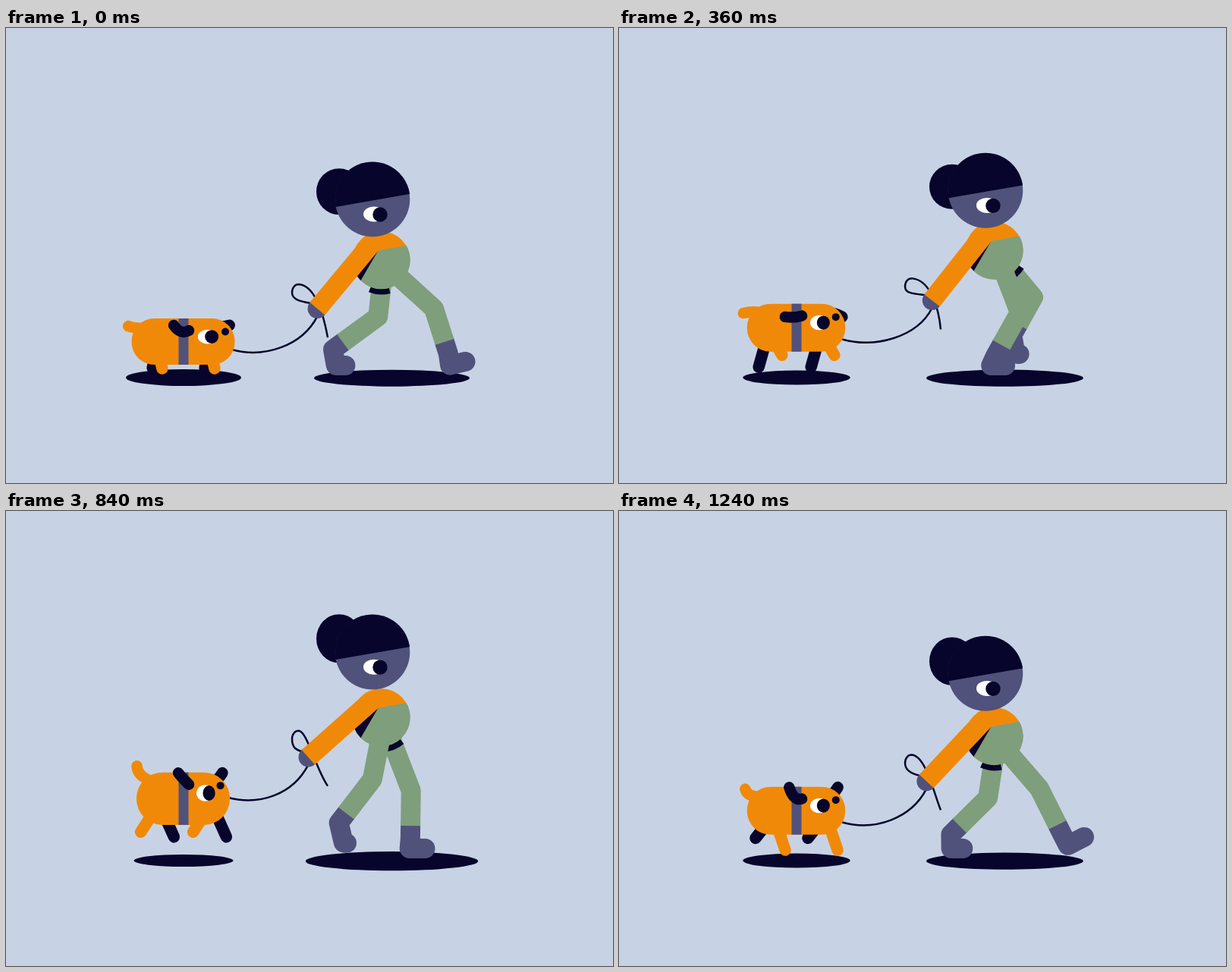
An HTML page with a canvas that plays this animation: 800 px wide and 600 px high, repeating every 1280 ms.

```html
<!DOCTYPE html>
<html lang="en">
<head>
<meta charset="utf-8">
<title>Dog walk</title>
<style>
html, body { margin: 0; width: 100%; height: 100%; overflow: hidden; background: #c7d3e4; }
canvas { display: block; }
</style>
</head>
<body>
<canvas id="stage" width="800" height="600"></canvas>
<script>
const ctx = document.getElementById('stage').getContext('2d');
const SKY = '#c7d3e4', NAVY = '#07052b', SLATE = '#50527b', GREEN = '#7f9e7c', ORANGE = '#f18908', WHITE = '#fff';
const LOOP = 1280, STRIDE = LOOP / 2, BOUNCE = LOOP / 4, STEP = 40;
const GROUND = 445;
const { sin, cos, abs, min, tanh, PI } = Math;
const radians = degrees => degrees * PI / 180;

// Key poses of one leg: time, knee, ankle, boot angle, foot length.
const POSES = [
  [40, 490, 380, 438, 413, 101, 10],
  [120, 459, 356, 420, 403, 93, 6],
  [360, 546, 355, 526, 391, 95, 5],
  [500, 565, 339, 609, 379, 43, 29],
  [600, 554, 366, 578, 414, 63, 24],
  [640, 564, 370, 578, 414, 77, 21],
  [680, 551, 368, 556, 416, 86, 22],
  [760, 536, 366, 546, 414, 82, 21],
  [1000, 528, 375, 504, 418, 116, 21],
  [1160, 483, 373, 461, 416, 116, 22]
];

// Smooth periodic curve through the key poses.
function legPose(time) {
  const n = POSES.length, t = time % LOOP;
  const pose = i => {
    const turn = Math.floor(i / n), [start, ...values] = POSES[i - turn * n];
    return [start + turn * LOOP, ...values];
  };
  const i = POSES.filter(p => p[0] <= t).length - 1;
  const [a, b, c, d] = [-1, 0, 1, 2].map(k => pose(i + k));
  const span = c[0] - b[0], u = (t - b[0]) / span;
  return b.map((v, k) => {
    const m0 = (c[k] - a[k]) / (c[0] - a[0]) * span;
    const m1 = (d[k] - b[k]) / (d[0] - b[0]) * span;
    const rise = c[k] - v;
    return v + u * (m0 + u * (3 * rise - 2 * m0 - m1 + u * (m0 + m1 - 2 * rise)));
  }).slice(1);
}

function ellipse(color, x, y, rx, ry = rx) {
  ctx.fillStyle = color;
  ctx.beginPath();
  ctx.ellipse(x, y, rx, ry, 0, 0, 2 * PI);
  ctx.fill();
}

function polygon(color, ...points) {
  ctx.fillStyle = color;
  ctx.beginPath();
  points.forEach(p => ctx.lineTo(...p));
  ctx.fill();
}

function stroke(color, width, cap = 'round') {
  ctx.strokeStyle = color;
  ctx.lineWidth = width;
  ctx.lineCap = cap;
  ctx.lineJoin = 'round';
  ctx.stroke();
}

function line(color, width, cap, ...points) {
  ctx.beginPath();
  points.forEach(p => ctx.lineTo(...p));
  stroke(color, width, cap);
}

function bend(color, width, x0, y0, cx, cy, x1, y1) {
  ctx.beginPath();
  ctx.moveTo(x0, y0);
  ctx.quadraticCurveTo(cx, cy, x1, y1);
  stroke(color, width);
}

function insideCircle(x, y, r, draw) {
  ctx.save();
  ctx.beginPath();
  ctx.arc(x, y, r, 0, 2 * PI);
  ctx.clip();
  draw();
  ctx.restore();
}

function leg(time, bodyY, banded) {
  const [kx, ky, ax, ay, bootAngle, foot] = legPose(time);
  const boot = radians(bootAngle), shin = Math.hypot(ax - kx, ay - ky);
  const ahead = (x, y, angle, length) => [x + length * cos(angle), min(GROUND, y + length * sin(angle))];
  const cuff = [ax + (ax - kx) / shin * 16, ay + (ay - ky) / shin * 16];
  const heel = ahead(ax, ay, boot, 31 + (22 - foot) * 0.45);
  const toe = ahead(...heel, boot - PI / 2, foot);
  line(SLATE, 26, 'round', [ax, ay], cuff, heel, toe);
  line(GREEN, 26, 'butt', [498, bodyY + 4], [kx, ky], [ax, ay]);
  if (banded) {
    const angle = Math.atan2(ky - bodyY, kx - 495);
    ctx.beginPath();
    ctx.arc(495, bodyY, 41.5, angle - 0.32, angle + 0.32);
    stroke(NAVY, 8, 'butt');
  }
}

function leash(startX, startY, wristX, wristY, beat) {
  const loopY = wristY - 21 + 4 * sin(beat), endY = wristY + 38;
  ctx.beginPath();
  ctx.moveTo(startX, startY);
  ctx.bezierCurveTo(startX + 43, startY + 12, wristX - 20, wristY + 49, wristX, wristY + 10);
  ctx.moveTo(wristX - 3, wristY - 6);
  ctx.bezierCurveTo(wristX - 17, wristY - 9, 377, loopY + 11, 377, loopY);
  ctx.bezierCurveTo(377, loopY - 7, 381, loopY - 11, 386, loopY - 11);
  ctx.bezierCurveTo(wristX - 1, loopY - 9, wristX + 9, endY - 25, 424, endY);
  stroke(NAVY, 2.5, 'butt');
}

function dogLegs(color, time, bottom) {
  const phase = time / STRIDE * 2 * PI;
  const x = 199.5 - 22 * tanh(3 * sin(phase - 0.1));
  const y = min(449, bottom + 12.5 + 8.5 * cos(phase));
  for (const dx of [0, 69])
    line(color, 15.5, 'round', [100 + x / 2 + dx, bottom - 8], [x + dx, y]);
}

function dog(t, beat, hop) {
  const mid = 233.5, top = 383 - 40 * hop, w = 136 - 13.5 * hop, h = 61 + 9 * hop ** 2;
  const left = mid - w / 2, right = mid + w / 2, bottom = top + h;
  const flap = sin(beat), wag = cos(beat - 0.69);

  dogLegs(NAVY, t + STRIDE / 2, bottom);
  bend(NAVY, 15, right - 22, top + 12, right - 16, top + 11, right - 7 + 4 * flap, top + 9 + 11.7 * flap);
  bend(ORANGE, 14.5, left - 2.2 - 2.8 * wag, top + 2 + 10.5 * wag,
    left + 5.5 + 7 * flap, top + 7 + 8 * cos(beat + 0.6), left + 24, top + 13);
  ctx.fillStyle = ORANGE;
  ctx.beginPath();
  ctx.roundRect(left, top, w, h, h / 2 - 0.5);
  ctx.fill();
  dogLegs(ORANGE, t, bottom);
  ctx.fillStyle = SLATE;
  ctx.fillRect(227.5, top, 13, h);

  const earX = 241, earY = top + 16;
  bend(NAVY, 14.5, earX, earY, earX - 11, earY - 4 + 10 * cos(beat),
    earX - 18 - 4.3 * cos(beat - 1.1), earY - 7 + 11.7 * flap);
  const eyeX = mid + w * 0.235, eyeY = top + h * 0.395;
  ellipse(WHITE, eyeX, eyeY, w * 0.093, h * 0.155);
  ellipse(NAVY, eyeX + w * 0.042, eyeY, w * 0.066, h * 0.145);
  ellipse(NAVY, right - 12.5, top + 17.5, 5);
}

function head(x, y, bun) {
  ellipse(NAVY, x - 44, y + bun, 30, 28.5 - bun * 0.2);
  ellipse(SLATE, x, y, 49.3);
  insideCircle(x, y, 49.6, () =>
    polygon(NAVY, [x - 52, y + 10.5], [x + 52, y - 7.5], [x + 52, y - 52], [x - 52, y - 52]));
  ellipse(WHITE, x + 2, y + 19.5, 14, 10);
  ellipse(NAVY, x + 10, y + 20, 9.7);
}

function torso(x, y) {
  ellipse(ORANGE, x, y, 38);
  insideCircle(x, y, 38.3, () => {
    const fold = [x - 4, y - 12.5], hem = [x - 27, y + 27];
    polygon(GREEN, fold, [x + 40, y - 20.5], [x + 40, y + 40], [x - 31, y + 40], hem);
    polygon(NAVY, fold, hem, [x - 45, y + 27], [x - 45, y]);
  });
}

function draw(t) {
  const beat = t / BOUNCE * 2 * PI;
  const rise = abs(sin(beat / 2)) ** 1.4;
  const hop = 1 - abs(1 - 2 * (t % BOUNCE) / BOUNCE) ** 2.3;
  const sway = cos(beat - PI / 4);
  const headY = 226 - 44.5 * rise;
  const bodyY = headY + 82.5 - 3.5 * sway;
  const arm = radians(46.7 + 5 * sway);
  const shoulder = [482, bodyY - 22];
  const wrist = [482 - 112 * cos(arm), bodyY - 22 + 112 * sin(arm)];

  ctx.fillStyle = SKY;
  ctx.fillRect(0, 0, 800, 600);
  ellipse(NAVY, 234, 461, 76 - 11 * hop, 11 - 3.1 * hop);
  ellipse(NAVY, 508.5, 461.7, 102.5 + 14 * rise ** 2, 11 + 2 * rise ** 2);

  leash(297.5 - 6.7 * hop, 424 - 52 * rise, ...wrist, beat);
  dog(t, beat, hop);

  leg(t, bodyY, true);
  torso(494.5, bodyY);
  leg(t + LOOP / 2, bodyY, false);

  ellipse(SLATE, ...wrist, 12.8);
  line(ORANGE, 26, 'butt', shoulder, wrist);
  ellipse(ORANGE, ...shoulder, 13);
  head(483, headY, -11.5 + 8 * sin(beat + 0.15));
}

function frame() {
  const t = performance.now() % LOOP;
  draw(Math.floor(t / STEP) * STEP);
  requestAnimationFrame(frame);
}
frame();
</script>
</body>
</html>
```
